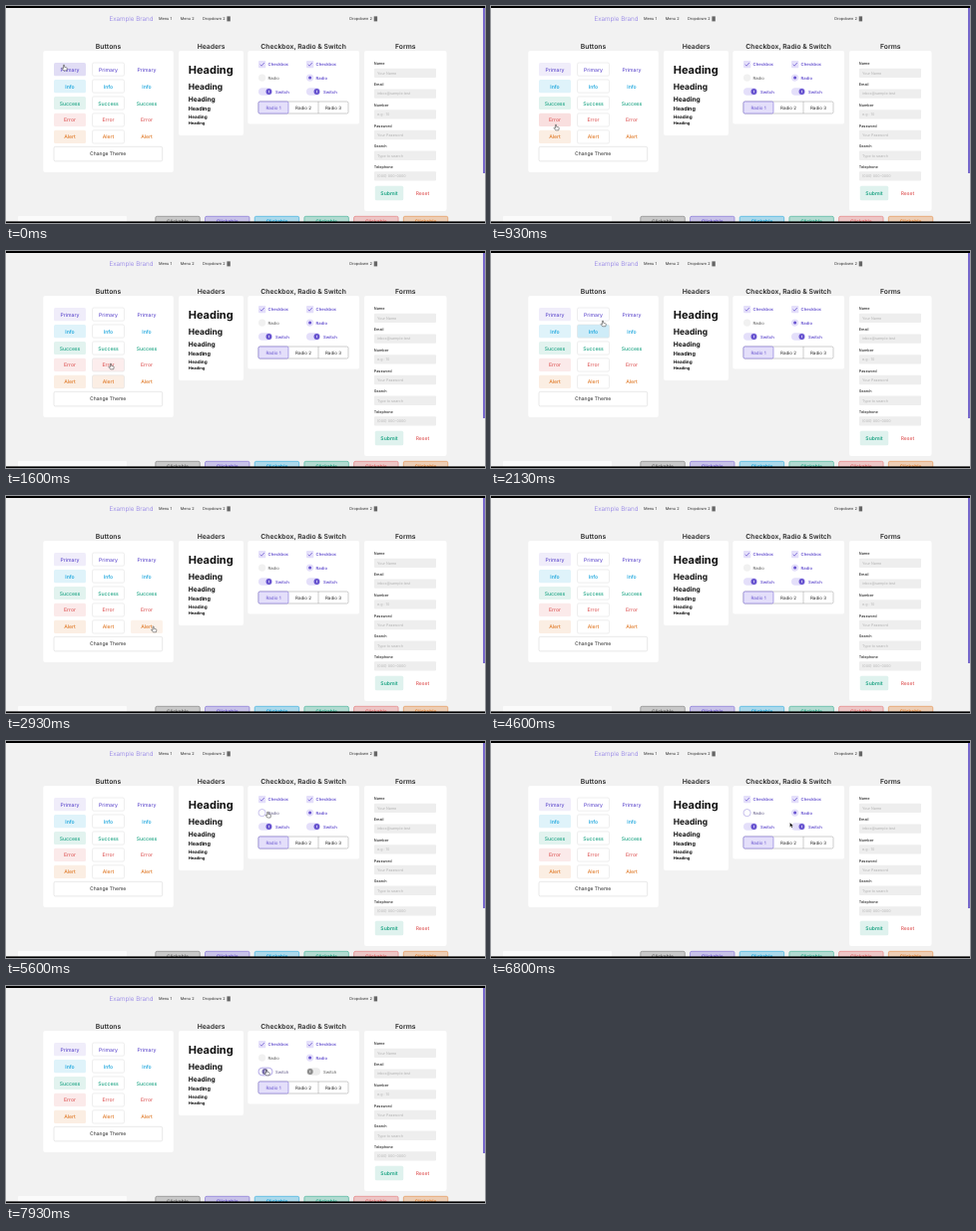
These frames come from a looping animation (480 by 218 pixels, 8 s). An HTML page:

```html
<!DOCTYPE html>
<html lang="en">
<head>
<meta charset="utf-8">
<title>UI kit demo</title>
<style>
  html, body { margin: 0; width: 100%; height: 100%; overflow: hidden; background: #f2f2f2; }
  svg { display: block; width: 100%; height: 100%; }
  text { font-family: Inter, Roboto, sans-serif; text-rendering: geometricPrecision; white-space: pre; }
</style>
</head>
<body>
<svg id="stage" viewBox="0 0 480 218"></svg>
<script>
const PURPLE = '#6753cf', GREEN = '#1fa585', RED = '#e06060', INK = '#2a2a2a', TINT = '#e4dffa';
const LOOP = 8000, FADE = 260, SAMPLES = 26;
const stage = document.getElementById('stage');
const $ = id => document.getElementById(id);

const rect = (x, y, w, h, fill, more = '') =>
  `<rect x="${x}" y="${y}" width="${w}" height="${h}" fill="${fill}" ${more}/>`;
const circle = (x, y, r, fill, more = '') =>
  `<circle cx="${x}" cy="${y}" r="${r}" fill="${fill}" ${more}/>`;
const text = (x, y, size, str, fill = INK, more = '') =>
  `<text x="${x}" y="${y}" font-size="${size}" fill="${fill}" ${more}>${str}</text>`;
const outline = (color, width = .5) => `rx="1.5" stroke="${color}" stroke-width="${width}"`;
const MID = 'text-anchor="middle" ', MEDIUM = 'font-weight="500"', BOLD = 'font-weight="600"';

const kinds = Object.entries({
  Primary: PURPLE, Info: '#0a9fda', Success: GREEN, Error: RED, Alert: '#e07a28'
});
const buttons = [];

function navbar() {
  const item = (x, s) => text(x, 14.3, 3.9, s);
  const dropdown = x => item(x, 'Dropdown 2') + rect(x + 24.4, 10.4, 3.4, 5, '#666');
  return text(103.5, 15.4, 6.3, 'Example Brand', '#8b79e6', 'font-weight="300"') +
    item(153, 'Menu 1') + item(174.7, 'Menu 2') + dropdown(197) + dropdown(344.3);
}

const card = (title, x, w, h) => rect(x, 45, w, h, '#fff', 'rx="2"') +
  text(x + w / 2, 42.5, 6.8, title, INK, MID + BOLD);

const cards = () => card('Buttons', 37.3, 130.5, 122) + card('Headers', 173, 65, 85) +
  card('Checkbox, Radio &amp; Switch', 242.3, 111.7, 73.5) + card('Forms', 359, 82.5, 161);

// Columns: filled, outlined and plain buttons
function buttonGrid() {
  let out = '';
  for (let col = 0; col < 3; col++) kinds.forEach(([name, color], row) => {
    const b = { id: `b${col}${row}`, x: 48 + 38.5 * col, y: 57 + 16.95 * row, w: 32, h: 13.2 };
    b.base = col ? 0 : row ? .13 : .1;
    b.gain = col === 1 ? .3 : .1;
    buttons.push(b);
    out += rect(b.x, b.y, b.w, b.h, color, `id="${b.id}" rx="1.5"`) +
      (col === 1 ? rect(b.x, b.y, b.w, b.h, 'none', outline('#dcdcdc')) : '') +
      text(b.x + 16, b.y + 8.6, 5.1, name, color, MID + MEDIUM);
  });
  return out + rect(48, 141.3, 108.7, 14.6, '#fff', outline('#d0d0d0')) +
    text(102.2, 150.4, 5, 'Change Theme', INK, MID);
}

function headings() {
  let out = '', y = 68.2;
  for (let i = 0; i < 6; i++) {
    out += text(182.7, y, 2.9 + 8.1 * .68 ** i, 'Heading', '#111', 'font-weight="700"');
    y += 4.5 + 11.3 * .65 ** i;
  }
  return out;
}

function choices() {
  let out = rect(253, 96, 90, 12, '#fff', outline('#999')) +
    '<path d="M313 96v12" stroke="#999" stroke-width=".5"/>' +
    rect(253, 96, 30, 12, TINT, outline(PURPLE));
  for (let n = 1; n < 4; n++)
    out += text(238 + 30 * n, 103.6, 4.5, 'Radio ' + n, n === 1 ? PURPLE : INK, MID);
  [253, 301].forEach((x, i) => {
    out += rect(x, 55, 7.3, 7.3, TINT, 'rx="1"') +
      `<path d="M${x + 1.7} 58.7l1.4 1.5 2.7-3.2" fill="none" stroke="${PURPLE}" stroke-width=".7"/>` +
      text(x + 9.6, 60.2, 4.2, 'Checkbox', PURPLE, BOLD) +
      circle(x + 3.6, 72.1, 3.6, '#f1f1f1', `id="ring${i}" stroke="${PURPLE}" stroke-width=".4"`) +
      circle(x + 3.6, 72.1, 1.5, PURPLE, `id="dot${i}"`) +
      text(x + 9.6, 73.7, 4.2, 'Radio', INK, `id="radio${i}"`) +
      rect(x, 82.2, 14, 7.6, TINT, `id="track${i}" rx="3.8" stroke="${PURPLE}" stroke-width=".5"`) +
      `<g id="knob${i}">${circle(x + 3.8, 86, 2.9, 'inherit')}${rect(x + 3.5, 84.8, .6, 2.4, '#fff')}</g>` +
      text(x + 17, 87.5, 4.2, 'Switch', PURPLE, `id="switch${i}"`);
  });
  return out;
}

function form() {
  const fields = Object.entries({
    Name: 'Your Name', Email: 'inbox@sample.test', Number: 'e.g : 10',
    Password: 'Your Password', Search: 'Type to search', Telephone: '(000) 000-0000'
  });
  return fields.map(([label, hint], i) => {
    const y = 59.4 + i * 20.72;
    return text(368.8, y, 3.8, label, INK, MEDIUM) +
      rect(369, y + 3.3, 62, 9.3, '#eee', 'rx="1"') +
      text(372, y + 9.3, 3.7, hint, '#b4b4b4');
  }).join('') +
    rect(369.8, 180.7, 28.4, 14.5, GREEN, 'rx="1.5" fill-opacity=".14"') +
    text(384, 189.8, 5.1, 'Submit', GREEN, MID + BOLD) +
    text(417.5, 189.8, 5.1, 'Reset', RED, MID + MEDIUM);
}

function edges() {
  const row = ['#666', ...kinds.map(k => k[1])].map((color, i) => {
    const x = 149.8 + i * 49.7;
    return rect(x, 211.3, 44.5, 14, color, outline(color) + ' fill-opacity=".3"') +
      text(x + 22.2, 218.2, 4.9, 'Clickable', color, MID + BOLD);
  }).join('');
  return rect(12, 211, 109, 6, '#fbfbfb', 'rx="1"') + row +
    rect(478, 2, 2, 166, '#7768cc') +
    rect(0, 0, 480, 2, '#000') + rect(0, 216.4, 480, 2, '#000');
}

const pointer = `<g id="pointer">
  <path id="arrow" d="M0 0v4.6l1.1-1 .8 1.6.8-.4-.8-1.6h1.5z" stroke="#fff" stroke-width=".3"/>
  <path id="hand" d="M-.5 .2q.5-.5 1 0v2l2.1.6q.8.2.6 1l-.4 2h-3.1l-1.8-2.4q.3-.7 1.6.3z"
    fill="#fff" stroke="#333" stroke-width=".5"/></g>`;

stage.innerHTML = rect(0, 0, 480, 218, '#f2f2f2') + navbar() + cards() + buttonGrid() +
  headings() + choices() + form() + edges() + pointer;

// Corners of the pointer's path: time, x, y
const path = [
  [0, 58, 59], [930, 65, 119], [1150, 68, 131], [1380, 102, 131],   // down column 1
  [2130, 112, 70], [2260, 116, 63], [2380, 140, 64],                // up column 2
  [2720, 144, 131], [2950, 148, 131], [3600, 154, 57.5],            // down and up column 3
  [4100, 154, 57.5], [4930, 240, 64], [5250, 247, 66],
  [5480, 262, 71], [6000, 263, 72], [6400, 304, 72],                // radios
  [6800, 299.5, 82], [7000, 306, 86], [7300, 306, 86], [7650, 261, 84], [LOOP, 261, 84]
];

const ramp = (t, from, span) => Math.min(1, Math.max(0, (t - from) / span));
const mix = (a, b, k) => `color-mix(in srgb, ${b} ${k * 100}%, ${a})`;

function pointerAt(t) {
  const i = Math.max(1, path.findIndex(p => p[0] > t));
  const [t0, x0, y0] = path[i - 1], [t1, x1, y1] = path[i];
  const k = ramp(t, t0, t1 - t0);
  return [x0 + (x1 - x0) * k, y0 + (y1 - y0) * k];
}

const inside = ([px, py], { x, y, w, h }) => px >= x && px <= x + w && py >= y && py <= y + h;
const controls = [253, 301].flatMap(x => [
  { x, y: 68, w: 21, h: 8 }, { x, y: 82.5, w: 31, h: 7.5 }
]);

function label(id, level) {
  $(id).style.fill = mix('#555', PURPLE, level);
  $(id).style.fontWeight = level > .5 ? 600 : 400;
}

function surface(id, off, on, focus) {
  $(id).style.fill = mix(mix(off, '#fff', focus), TINT, on);
  $(id).style.strokeOpacity = focus;
}

function setRadio(i, on, focus) {
  $('dot' + i).setAttribute('r', 1.5 * on);
  surface('ring' + i, '#f1f1f1', on, focus);
  label('radio' + i, Math.max(on, focus * .4));
}

function setSwitch(i, on, focus) {
  $('knob' + i).setAttribute('transform', `translate(${6.6 * on})`);
  $('knob' + i).style.fill = mix('#8c8c8c', PURPLE, Math.max(on, focus * .5));
  surface('track' + i, '#ececec', on * (1 - focus), focus);
  label('switch' + i, on);
}

function draw(t) {
  const pos = pointerAt(t);
  // Hover strength is the share of the last FADE ms spent on the button
  const trail = Array.from({ length: SAMPLES }, (_, i) => pointerAt(t - i * FADE / SAMPLES));
  for (const b of buttons) {
    const level = trail.filter(p => inside(p, b)).length / SAMPLES;
    $(b.id).setAttribute('fill-opacity', b.base + b.gain * level);
  }
  const first = ramp(t, 5700, 200) - ramp(t, 6500, 200);
  setRadio(0, first, ramp(t, 5430, 200) - ramp(t, 6780, 200));
  setRadio(1, 1 - first, 0);
  setSwitch(0, 1 - ramp(t, 7810, 200), ramp(t, 7560, 200));
  setSwitch(1, 1 - ramp(t, 7120, 200), ramp(t, 6950, 200) - ramp(t, 7400, 200));

  const over = [...buttons, ...controls].some(c => inside(pos, c));
  $('hand').style.display = over ? '' : 'none';
  $('arrow').style.display = over ? 'none' : '';
  $('pointer').setAttribute('transform', `translate(${pos})`);
}

const start = performance.now();
(function tick() {
  draw((performance.now() - start) % LOOP);
  requestAnimationFrame(tick);
})();
</script>
</body>
</html>
```
